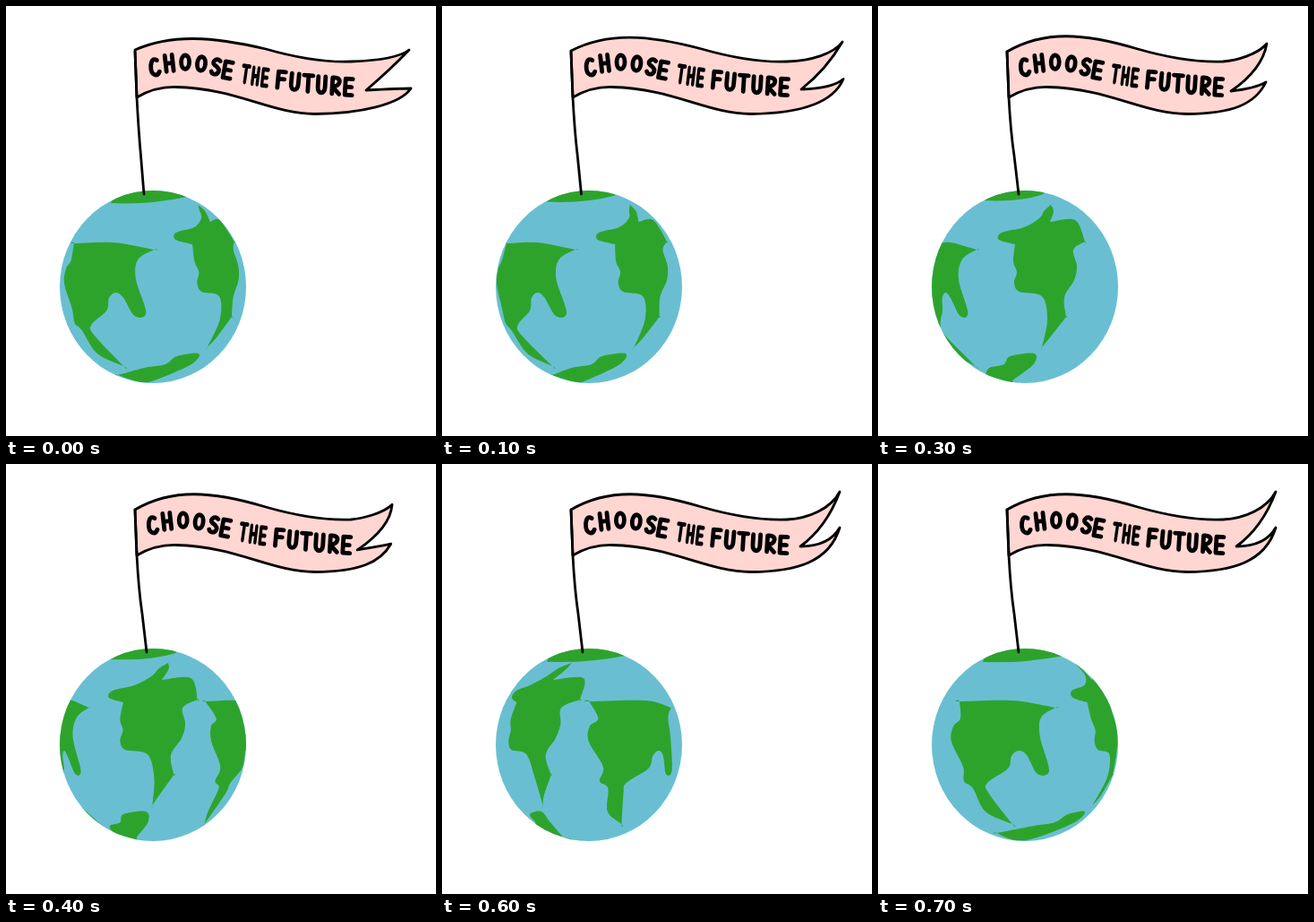
An HTML page that plays this animation: 480x480 px, repeating every 0.8 s.

```html
<!DOCTYPE html>
<html lang="en">
<head>
<meta charset="utf-8">
<title>Choose the future</title>
<style>
html, body { margin: 0; width: 100%; height: 100%; overflow: hidden; background: #fff; }
svg { display: block; width: 100vw; height: 100vh; }
.sea { fill: #69bfd1; }
.land { fill: #2ea32c; }
.flag { fill: #ffd6d1; stroke: #000; stroke-width: 2.8; stroke-linejoin: round; }
.pole { fill: none; stroke: #000; stroke-width: 2.8; stroke-linecap: round; }
.ink { fill: none; stroke: #000; stroke-width: 4.8; stroke-linecap: round; stroke-linejoin: round; }
</style>
</head>
<body>
<svg id="stage" viewBox="0 0 480 480" role="img" aria-label="Choose the future">
  <defs><clipPath id="disc"></clipPath></defs>
</svg>
<script>
const STEP = 100;
const globe = { cx: 164, cy: 313.5, rx: 104, ry: 107.5 };
const stage = document.getElementById('stage');

// Globe turn in degrees, and flag pose (index into poses, fractions blend), per step
const turns = [-20, -30, -41, -55, -69, -82, -108, 0];
const sways = [0, 0.5, 1, 2, 2.3, 2, 1, 1];

function add(parent, tag, attrs) {
  const el = document.createElementNS('http://www.w3.org/2000/svg', tag);
  for (const k in attrs) el.setAttribute(k, attrs[k]);
  return parent.appendChild(el);
}

// "x,y" pairs; a trailing "!" doubles the point, which makes a sharp corner
const points = text => text.trim().split(/\s+/).flatMap(t => {
  const p = t.replace('!', '').split(',').map(Number);
  return t.endsWith('!') ? [p, p] : [p];
});

// Closed Catmull-Rom curve
function curve(pts) {
  const n = pts.length, at = i => pts[(i + n) % n];
  let d = 'M' + pts[0];
  for (let i = 0; i < n; i++) {
    const [a, b, c, e] = [at(i - 1), at(i), at(i + 1), at(i + 2)];
    const p = [0, 1].map(k => b[k] + (c[k] - a[k]) / 6);
    const q = [0, 1].map(k => c[k] - (e[k] - b[k]) / 6);
    d += `C${p} ${q} ${c}`;
  }
  return d + 'Z';
}

// Half width of the globe at a height
const halfWidth = y => globe.rx * Math.sqrt(Math.max(0.01, 1 - ((y - globe.cy) / globe.ry) ** 2));

// Flat drawing -> longitudes on the sphere, and back after a turn
const unwrap = text => points(text).map(([x, y]) =>
  [Math.asin(Math.max(-1, Math.min(1, (x - globe.cx) / halfWidth(y)))), y]);

const project = (shape, degrees) => shape.map(([lon, y]) => {
  const a = lon + degrees * Math.PI / 180;
  const s = Math.abs(a) < Math.PI / 2 ? Math.sin(a) : 1.06 * Math.sign(a);
  return [globe.cx + s * halfWidth(y), y];
});

const east = unwrap(`91,265! 150,264 198,272! 182,283 181,305 191,342 178,346 166,325 157,320 149,326
  145,340 122,356 124,368 150,402! 120,388 106,362 96,354 95,338 82,310 84,293 92,284`);
const west = unwrap(`135,261 138,253 163,247 180,237 186,228 193,222! 196,229 192,241! 220,239 231,263!
  218,272 222,290 219,306 208,325 210,347! 192,370 183,381! 189,350 183,324 158,319 152,309 155,297
  151,285 153,266!`);
const south = unwrap('119,412! 135,404 155,400 165,391 192,388 188,400 158,417 130,420');

// Each land and the turn at which it was drawn
const lands = [[east, 0], [east, 160], [west, 55], [south, 41]];

function polarCap(i) {
  const swing = Math.cos((i - 6.7) * Math.PI / 4);
  const right = 196 + 12 * swing, deep = 218 + 2 * swing;
  return `M117 ${deep + 1}Q160 ${deep + 3} ${right} ${deep - 6}L190 200H125Z`;
}

// Upper tip, notch, lower tip
const poses = [
  [450, 49, 402, 94, 452, 92],
  [444, 31, 400, 92, 444, 71],
  [434, 42, 394, 95, 433, 85]
];

function flag(sway) {
  const k = Math.min(1, Math.floor(sway));
  const [x, y, nx, ny, u, v] = poses[k].map((p, j) => p + (poses[k + 1][j] - p) * (sway - k));
  const sag = 4 * Math.max(0, 1 - sway);
  return `M144 ${51 - sag / 2}C185 ${27 + sag} 230 ${30 + sag} 290 48C325 58 360 63 385 62
    C${x - 34} 61 ${x - 10} ${y + (62 - y) * 0.6} ${x} ${y}
    Q429 71 ${nx} ${ny}Q${u - 12} 92 ${u} ${v}
    C${u - 12} 110 395 120 345 120.5C295 120 258 92 190 90.5C172 90 158 95 146 102Z`;
}

function pole(sway) {
  const slack = 3 * Math.max(0, 1 - sway);
  return `M144 51L146 102Q148 140 ${152 - slack / 2} 167L${157 - slack} 210`;
}

// Brush letters around their own centre, with half the room each one takes
const glyphs = {
  C: [8, 'M4.5-7Q0-12-3.5-3Q-6 5-2 8Q1 10 4 6'],
  H: [9, 'M-4-9V9M4-9V9M-4 0H4'],
  O: [9, 'M0-7.7C-6-7-6 7 0 7.7C6 7 6-7 0-7.7Z'],
  S: [7.5, 'M4-7C0-11-6-5-2-2C1 0 5 1 4 5C2 10-3 9-4 6'],
  E: [6.5, 'M4-9H-4V9H4M-4 0H3'],
  T: [7, 'M-5-9H5M0-9V9'],
  F: [7, 'M4-9H-4V9M-4-1H3'],
  U: [8, 'M-4-9V3C-4 11 4 11 4 3V-9'],
  R: [8, 'M-4 9V-9C7-11 6 1-4 1L4 9']
};
// Word, place along the line, letter width
const words = [['CHOOSE', -2, 1], ['THE', 105, 0.7], ['FUTURE', 143.5, 1]];
const line = add(stage, 'path', {
  d: 'M158 71C180 60 205 60 240 70S305 82 335 86.5L388 91', fill: 'none'
});

function letter(parent, c, along, wide) {
  const p = line.getPointAtLength(along), q = line.getPointAtLength(along + 1);
  const tilt = 0.7 * Math.atan2(q.y - p.y, q.x - p.x) * 180 / Math.PI;
  add(parent, 'path', {
    d: glyphs[c][1],
    transform: `translate(${p.x} ${p.y}) rotate(${tilt}) scale(${wide} 1)`
  });
}

function lettering(parent) {
  for (const [word, start, wide] of words) {
    let along = start;
    for (const c of word) {
      const half = glyphs[c][0] * wide;
      letter(parent, c, along + half, wide);
      along += 2 * half;
    }
  }
}

function scene(turn, i) {
  const g = add(stage, 'g', { display: 'none' });
  const green = add(g, 'g', { class: 'land', 'clip-path': 'url(#disc)' });
  for (const [shape, home] of lands) {
    const angle = home + turn;
    if (angle < 100) add(green, 'path', { d: curve(project(shape, angle)) });
  }
  add(green, 'path', { d: polarCap(i) });
  const sway = sways[i];
  add(g, 'path', { class: 'flag', d: flag(sway) });
  add(g, 'path', { class: 'pole', d: pole(sway) });
  const shift = Math.max(0, 2.4 - 1.2 * sway);
  lettering(add(g, 'g', { class: 'ink', transform: `translate(${shift} 0)` }));
  return g;
}

const { cx, cy, rx, ry } = globe;
add(document.getElementById('disc'), 'ellipse', { cx, cy, rx, ry });
add(stage, 'ellipse', { class: 'sea', cx, cy, rx, ry });
const scenes = turns.map(scene);

let shown = -1;
function draw() {
  const now = Math.floor(performance.now() / STEP) % scenes.length;
  if (now !== shown) {
    scenes.forEach((g, i) => g.setAttribute('display', i === now ? 'inline' : 'none'));
    shown = now;
  }
  requestAnimationFrame(draw);
}
draw();
</script>
</body>
</html>
```
